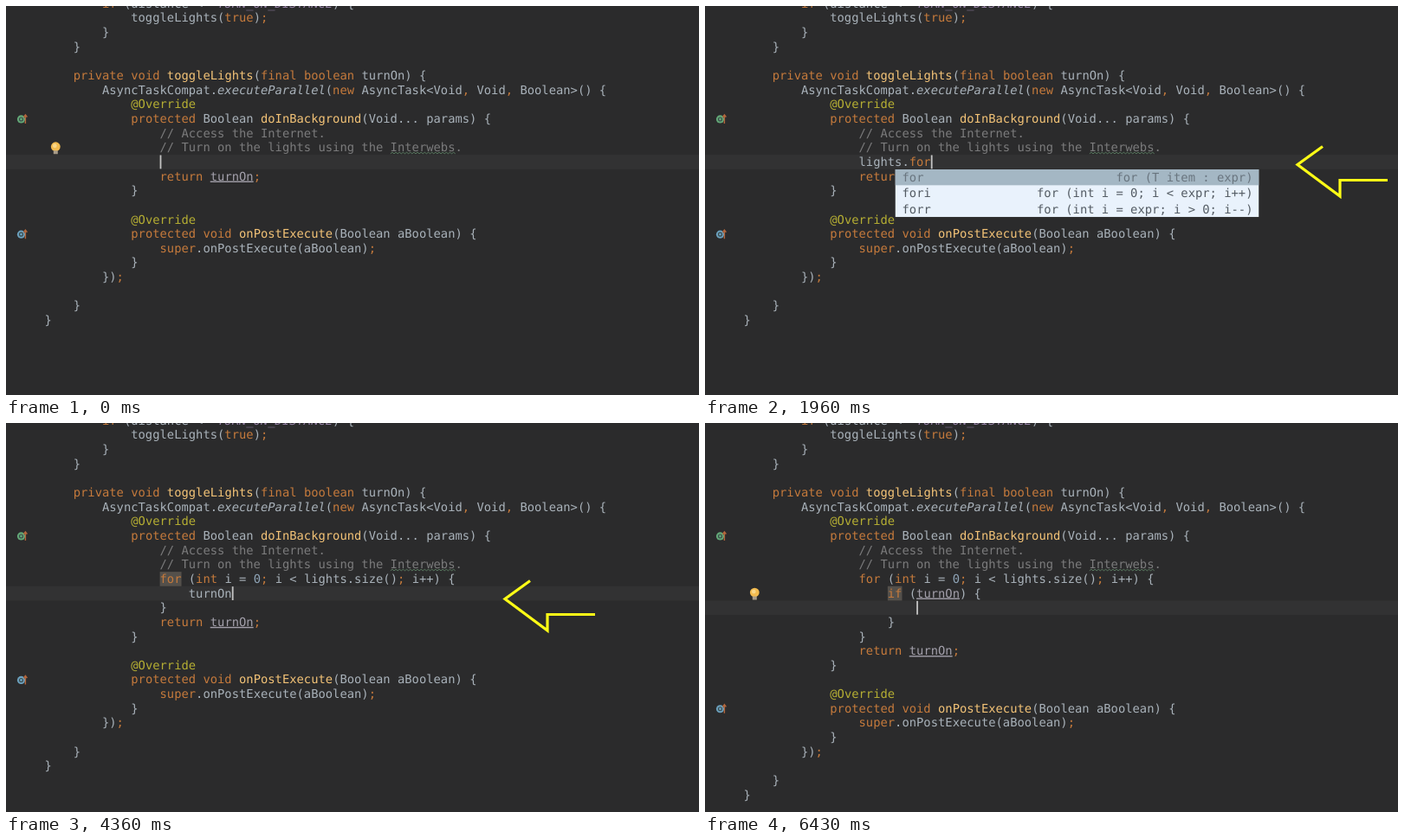
These frames come from a looping animation (800 by 450 pixels, 6.5 s). An HTML page:

```html
<!DOCTYPE html>
<html lang="en">
<head>
<meta charset="utf-8">
<title>Postfix completion</title>
<style>
  html, body { margin: 0; width: 100%; height: 100%; overflow: hidden; background: #2b2b2c; }
  svg { display: block; }
  text {
    font: 13.82px "DejaVu Sans Mono", "Liberation Mono", monospace;
    white-space: pre; fill: #a9b2ba; text-rendering: geometricPrecision;
  }
  .comment { fill: #7b7b7c; }
  .note { fill: #b5ae33; }
  .key { fill: #c57a3c; }
  .decl { fill: #f3c377; }
  .call { font-style: italic; }
  .const { fill: #9380a2; font-style: italic; }
  .num { fill: #8fa5b8; }
  .captured { fill: #a3a0ab; text-decoration: underline; }
  .popup text { fill: #535b63; }
  .popup .chosen { fill: #69757f; }
  .popup .match { fill: #b24cc4; }
  .popup .bold { font-weight: bold; }
  .popup .badge { font: 9px "DejaVu Sans", sans-serif; fill: #6c6464; text-anchor: middle; }
</style>
</head>
<body>
<svg id="stage" width="800" height="450" viewBox="0 0 800 450"></svg>
<script>
const LOOP = 6500, CHAR = 8.32, LINE = 16.65, ROW = 18.4, FIRST = 11;
const stage = document.getElementById('stage');
const colX = col => 11.2 + col * CHAR;
const baseline = row => 1.75 + row * LINE;
const rowTop = row => baseline(row) - 12.8;
const indent = (n, s) => ' '.repeat(n) + s;
const escape = s => s.replace(/&/g, '&amp;').replace(/</g, '&lt;').replace(/>/g, '&gt;');
const rect = (x, y, w, h, fill, extra = '') =>
  `<rect x="${x}" y="${y}" width="${w}" height="${h}" fill="${fill}" ${extra}/>`;
const latest = (list, t) => list.filter(item => item[0] <= t).pop();

const HEAD = [
  '            if (distance <= TURN_ON_DISTANCE) {',
  '                toggleLights(true);',
  '            }',
  '        }',
  '',
  '        private void toggleLights(final boolean turnOn) {',
  '            AsyncTaskCompat.executeParallel(new AsyncTask<Void, Void, Boolean>() {',
  '                @Override',
  '                protected Boolean doInBackground(Void... params) {',
  '                    // Access the Internet.',
  '                    // Turn on the lights using the Interwebs.'
];
const TAIL = [
  '                    return turnOn;',
  '                }',
  '',
  '                @Override',
  '                protected void onPostExecute(Boolean aBoolean) {',
  '                    super.onPostExecute(aBoolean);',
  '                }',
  '            });',
  '',
  '        }',
  '    }'
];
// The outer indentation is one level less than the text above.
HEAD.forEach((s, i) => { if (i < 4 && i !== 0 && i !== 1) HEAD[i] = s; });

const TOKENS = new RegExp([
  '(?<comment>//.*)',
  '(?<note>@\\w+)',
  '(?<decl>(?<=(?:void|Boolean) )\\w+(?=\\())',
  '(?<call>executeParallel)',
  '(?<const>TURN_ON_DISTANCE)',
  '(?<captured>(?<=return |if \\()turnOn|turnOn(?=\\.i))',
  '(?<key>\\b(?:private|void|final|boolean|new|protected|super|return|true|for|int|if)\\b|[,;])',
  '(?<num>\\b0\\b)'
].join('|'), 'g');

function highlight(line) {
  let out = '', end = 0;
  for (const m of line.matchAll(TOKENS)) {
    const kind = Object.keys(m.groups).find(k => m.groups[k]);
    out += escape(line.slice(end, m.index)) + `<tspan class="${kind}">${escape(m[0])}</tspan>`;
    end = m.index + m[0].length;
  }
  return out + escape(line.slice(end));
}

// Typing: start, first gap, text
const typed = (start, gap, prefix, word) =>
  [...word].map((_, i) => [start + i * gap, prefix + word.slice(0, i + 1)]);
const LIST_KEYS = [[0, ''], ...typed(90, 92, '', 'lights'), [900, 'lights.'],
  ...typed(1500, 140, 'lights.', 'for'), [2300, 'lights.fori']];
const BODY_KEYS = [[0, ''], ...typed(3770, 102, '', 'turnOn'), [4480, 'turnOn.'],
  ...typed(4740, 130, 'turnOn.', 'if')];
const LOOP_HEAD = indent(20, 'for (int i = 0; i < lights.size(); i++) {');

function bodyAt(t) {
  if (t < 2960) {
    const line = indent(20, latest(LIST_KEYS, t)[1]);
    return { lines: [line], row: 11, col: line.length };
  }
  if (t < 5070) {
    const line = indent(24, latest(BODY_KEYS, t)[1]);
    const inside = t >= 3350;
    return { lines: [LOOP_HEAD, line, indent(20, '}')], row: inside ? 12 : 11, col: inside ? line.length : 30 };
  }
  return {
    lines: [LOOP_HEAD, indent(24, 'if (turnOn) {'), '', indent(24, '}'), indent(20, '}')],
    row: 13, col: 28
  };
}

// Rows: badge, label (*bold*, ~match~), right-hand text
const ALL = [
  ['f', '~l~ights', 'List<Light>'],
  ['m', 'toggle~L~ights(boolean turnOn)', 'void'],
  ['c', '~L~ist<E> (java.util)', ''],
  ['c', '~L~ight', ''],
  ['c', '~L~ong (java.lang)', ''],
  ['c', '~L~ocale (java.util)', ''],
  ['c', '~L~ocation (android.location)', ''],
  ['c', '~L~inkedList<E> (java.util)', ''],
  ['c', '~L~inkedHashMap<K, V> (java.util)', ''],
  ['c', '~L~ooper (android.os)', ''],
  ['c', '~L~og (android.util)', '']
];
const MATCHING = [
  ['f', '~lights~', 'List<Light>'],
  ['m', 'toggle~Lights~(boolean turnOn)', 'void']
];
const METHODS = [
  ['m', '*get*(int location)', 'Light'],
  ['m', '*add*(int location, Light object)', 'void'],
  ['m', '*add*(Light object)', 'boolean'],
  ['m', '*addAll*(Collection<? extends Light> colle…', 'boolean'],
  ['m', '*addAll*(int location, Collection<? extend…', 'boolean'],
  ['m', '*clear*()', 'void'],
  ['m', '*contains*(Object object)', 'boolean'],
  ['m', '*containsAll*(Collection<?> collection)', 'boolean'],
  ['m', '*equals*(Object object)', 'boolean'],
  ['m', '*hashCode*()', 'int'],
  ['m', '*indexOf*(Object object)', 'int']
];
const FORI = ['', 'fori', 'for (int i = 0; i < expr; i++)'];
const LOOPS = [['', 'for', 'for (T item : expr)'], FORI, ['', 'forr', 'for (int i = expr; i > 0; i--)']];
const CHECKS = [['', 'else', 'if (!expr)'], ['', 'if', 'if (expr)'], ['', 'not', '!expr'],
  ['', 'par', '(expr)'], ['', 'return', 'return expr'], ['', 'while', 'while (expr)']];

// start, end, x, editor row, width, rows, badge colour
const POPUPS = [
  [150, 430, 144.5, 11, 506, ALL, '#e6bab5'],
  [430, 900, 144.5, 11, 462, MATCHING, '#e6bab5'],
  [960, 1510, 203, 11, 462, METHODS, '#c6cbd1'],
  [1510, 2310, 219.5, 11, 420, LOOPS],
  [2310, 2920, 219.5, 11, 420, [FORI]],
  [4540, 4760, 253, 12, 314, CHECKS],
  [4760, 5070, 253, 12, 314, [CHECKS[1]]]
];

function popup([, , x, row, width, rows, tint]) {
  const full = rows.length > 10;
  const height = full ? 194 : rows.length * ROW;
  const label = s => escape(s)
    .replace(/\*(.+?)\*/g, '<tspan class="bold">$1</tspan>')
    .replace(/~(.+?)~/g, '<tspan class="match">$1</tspan>');
  let out = rect(0, 0, width, height, '#e9f2fc') + rect(0, 0, width, ROW, '#a4b7c4');
  rows.forEach(([badge, name, type], i) => {
    const y = i * ROW, cls = i ? '' : 'chosen';
    if (badge) {
      out += `<g opacity="${i ? 1 : 0.75}"><circle cx="9" cy="${y + 9.3}" r="6.4" fill="${tint}"/>
        <text class="badge" x="9" y="${y + 12.3}">${badge}</text></g>`;
      const ink = full ? '#8b9197' : '#c9707a';
      out += `<g opacity="${i ? 1 : 0.25}">${rect(20, y + 9, 7, 5, ink)}
        <path d="M21.5 ${y + 9}v-2q2-3 4 0v2" fill="none" stroke="${ink}"/></g>`;
    }
    out += `<text class="${cls}" x="${badge ? 33.3 : 8}" y="${y + 14}">${label(name)}</text>
      <text class="${cls}" x="${width - 7}" y="${y + 14}" text-anchor="end">${escape(type)}</text>`;
  });
  if (full) {
    out += rect(width - 7.5, 1, 6, 35, '#67727a', 'rx="2" opacity=".85"')
      + rect(width - 12, 182, 11, 11, '#e9f2fc', 'stroke="#a9b1b8"')
      + `<text class="badge" x="${width - 6.5}" y="190.5">π</text>`;
  }
  return `<svg class="popup" x="${x}" y="${rowTop(row) + LINE + 0.2}" width="${width}" height="${height}">${out}</svg>`;
}

// start and end of drawing, start and end of erasing, offset
const ARROWS = [
  [1000, 1390, 2420, 2820, 108, -20],
  [3800, 4190, 4600, 4950, 0, 0]
];
function arrow([drawStart, drawEnd, wipeStart, wipeEnd, dx, dy], t) {
  const part = (a, b) => Math.min(1, Math.max(0, (t - a) / (b - a)));
  const head = part(drawStart, drawEnd), tail = part(wipeStart, wipeEnd);
  if (head <= tail) return '';
  return `<path d="M680 221.5H625V240L576 203.5L605 182.5" transform="translate(${dx} ${dy})" pathLength="1"
    stroke-dasharray="0 ${tail} ${head - tail} 2" fill="none" stroke="#fdfc16" stroke-width="3.2"/>`;
}

const overrideIcon = (row, fill) => {
  const y = baseline(row) - 4;
  return `<circle cx="17.5" cy="${y}" r="4.6" fill="${fill}"/>
    <circle cx="17.5" cy="${y}" r="2" fill="none" stroke="#39484a" stroke-width="1.1"/>
    <path d="M22.4 ${y + 5}v-10m-2 2.6l2-2.6l2 2.6" fill="none" stroke="#b5673c" stroke-width="1.4"/>`;
};
const bulb = row => {
  const y = baseline(row) - 5.5;
  return `<circle cx="57.3" cy="${y}" r="5.4" fill="#f2bb50"/><circle cx="56.3" cy="${y - 1}" r="2.4" fill="#f9d78a"/>`
    + rect(54.8, y + 4.5, 5, 4, '#a79b88');
};
const mark = (row, col, length, fill) =>
  rect(colX(col), rowTop(row), length * CHAR, LINE, fill);
function wave(row, col, length) {
  let d = `M${colX(col)} ${baseline(row) + 2.6}`;
  for (let i = 0; i < length * 2; i++) d += `l${CHAR / 4} -1.6l${CHAR / 4} 1.6`;
  return `<path d="${d}" fill="none" stroke="#5f8467" stroke-width=".9"/>`;
}

function draw(t) {
  const { lines, row, col } = bodyAt(t);
  const next = FIRST + lines.length;
  let out = rect(0, 0, 800, 450, '#2b2b2c') + rect(0, rowTop(row), 800, LINE, '#323233');

  if (t >= 3350 && t < 5070) out += mark(11, 20, 3, '#54504b');
  if (t >= 4600 && t < 5070) {
    out += mark(5, 48, 6, '#404344') + mark(12, 24, 6, '#404344') + mark(next, 27, 6, '#404344');
  }
  if (t >= 5600) out += mark(12, 24, 2, '#54504b');

  [...HEAD, ...lines, ...TAIL].forEach((line, i) => {
    if (line) out += `<text x="${colX(0)}" y="${baseline(i)}">${highlight(line)}</text>`;
  });
  out += wave(10, 52, 9) + overrideIcon(8, '#63a877') + overrideIcon(next + 4, '#6ba0bd');
  if (t < 90) out += bulb(10);
  if (t >= 6330) out += bulb(12);
  out += rect(colX(col), rowTop(row) + 0.4, 1.8, LINE - 0.8, '#c3c3c3');
  for (const p of POPUPS) if (t >= p[0] && t < p[1]) out += popup(p);
  for (const a of ARROWS) out += arrow(a, t);
  return out;
}

let shown = '';
const start = performance.now();
function tick() {
  const picture = draw((performance.now() - start) % LOOP);
  if (picture !== shown) stage.innerHTML = shown = picture;
  requestAnimationFrame(tick);
}
tick();
</script>
</body>
</html>
```
